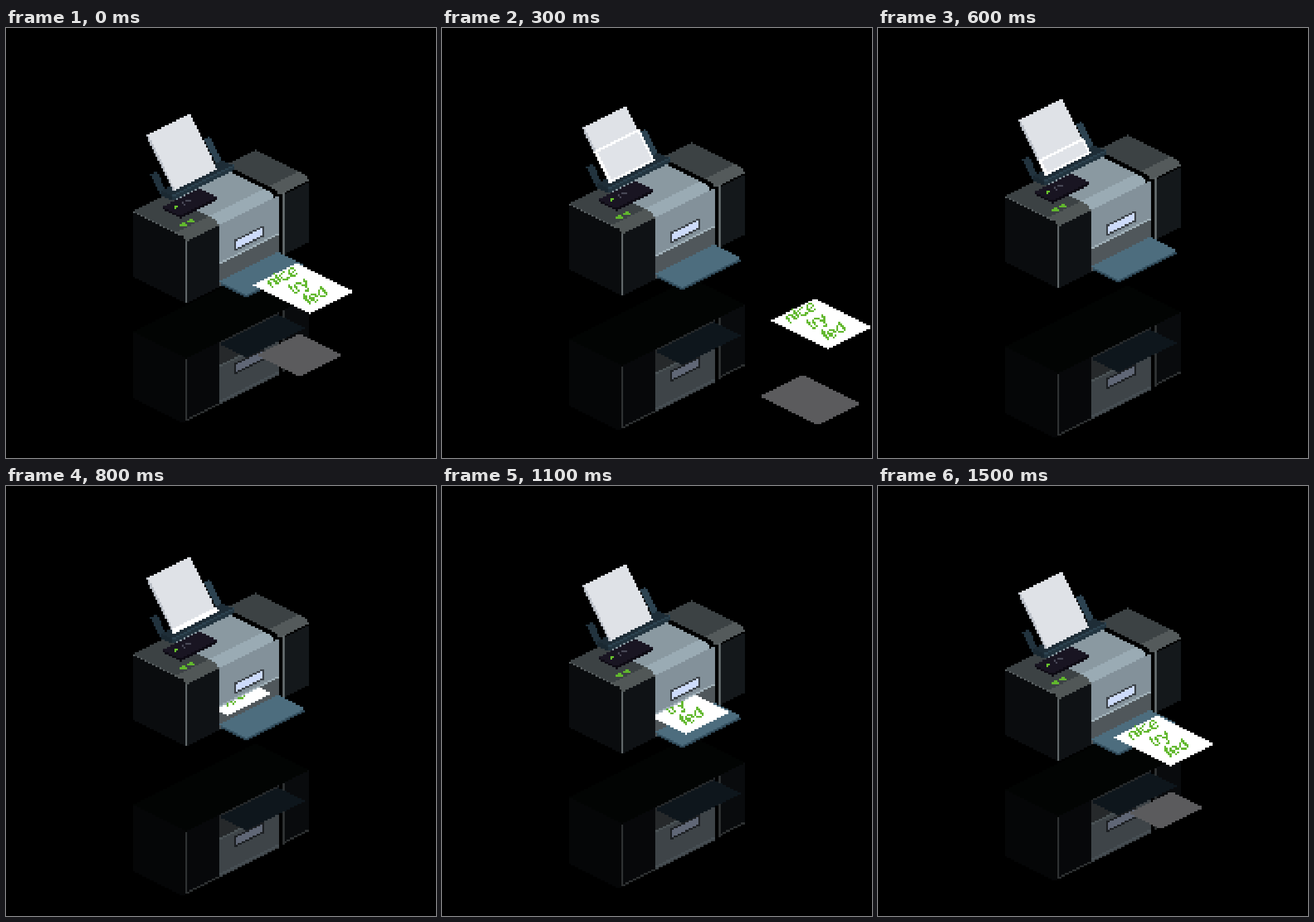
Write an HTML page with a canvas that moves like this. It is 748x748 px and loops after 1.6 s.

```html
<!DOCTYPE html>
<html lang="en">
<head>
<meta charset="utf-8">
<title>Printer</title>
<style>
  html, body { margin: 0; width: 100%; height: 100%; overflow: hidden; background: #000; }
  canvas { display: block; width: 748px; height: 748px; image-rendering: pixelated; }
</style>
</head>
<body>
<canvas id="stage" width="230" height="230"></canvas>
<script>
const SIZE = 230;
const CELL = 748 / SIZE;
const STEP = 100, STEPS = 16;
const DEPTH = 93, WIDTH = 213, HEIGHT = 115;
const BEVEL = 75, CURVE = 86, FRONT_HEIGHT = 108;
const INNER_LEFT = 57, INNER_RIGHT = 161, RIGHT_BLOCK = 168;
const TRAY_END = 140;
const GREEN = '#62b82e', WHITE = '#ffffff', BLACK = '#000000';

const ctx = document.getElementById('stage').getContext('2d');

// Drawing state: offset in cells, brightness, reflection and an optional clip test.
let shiftX, shiftY, tone, mirrored, visible;

function begin({ x = 0, y = 0, light = 1, mirror = false, keep = null }) {
  [shiftX, shiftY, tone, mirrored, visible] = [x, y, light, mirror, keep];
}

function setColor(hex) {
  const channels = hex.match(/\w\w/g).map(c => Math.round(parseInt(c, 16) * tone));
  ctx.fillStyle = `rgb(${channels})`;
}

function dot(x, y) {
  if (!visible || visible((x + .5) * CELL, (y + .5) * CELL)) ctx.fillRect(x, y, 1, 1);
}

// Fills every cell whose centre lies inside the polygon.
function fill(color, ...corners) {
  const points = corners.map(([x, y]) => [x / CELL + shiftX, y / CELL + shiftY]);
  const ys = points.map(p => p[1]);
  setColor(color);
  for (let y = Math.floor(Math.min(...ys)); y <= Math.max(...ys); y++) {
    const cy = y + .5;
    const hits = [];
    points.forEach(([x1, y1], i) => {
      const [x2, y2] = points[(i + 1) % points.length];
      if ((y1 <= cy) !== (y2 <= cy)) hits.push(x1 + (cy - y1) * (x2 - x1) / (y2 - y1));
    });
    hits.sort((p, q) => p - q);
    for (let i = 0; i + 1 < hits.length; i += 2) {
      for (let x = Math.ceil(hits[i] - .5); x < hits[i + 1] - .5; x++) dot(x, y);
    }
  }
}

// a runs right and down, b right and up, h is the height above the base.
function iso(a, b, h) {
  return [221 + a + b, 433 + (a - b) / 2 + (mirrored ? 96 + h : -h)];
}

function slab(color, a0, a1, b0, b1, h0, h1 = h0) {
  fill(color, iso(a0, b0, h0), iso(a0, b1, h0), iso(a1, b1, h1), iso(a1, b0, h1));
}

function front(color, b0, b1, h0, h1, a = DEPTH) {
  fill(color, iso(a, b0, h0), iso(a, b1, h0), iso(a, b1, h1), iso(a, b0, h1));
}

function lid(topColor, bevelColor, b0, b1) {
  slab(topColor, 0, BEVEL, b0, b1, HEIGHT);
  slab(bevelColor, BEVEL, CURVE, b0, b1, HEIGHT);
  slab(bevelColor, CURVE, DEPTH, b0, b1, HEIGHT, FRONT_HEIGHT);
}

function drawFronts() {
  fill('#0a0c0e', iso(0, 0, 0), iso(DEPTH, 0, 0), iso(DEPTH, 0, FRONT_HEIGHT),
    iso(CURVE, 0, HEIGHT), iso(0, 0, HEIGHT));
  front('#0f1215', 0, INNER_LEFT, 0, FRONT_HEIGHT);
  front('#50575b', INNER_LEFT, INNER_RIGHT, 0, 41);
  front('#83919a', INNER_LEFT, INNER_RIGHT, 41, FRONT_HEIGHT);
  front('#a2b2ba', INNER_LEFT, INNER_RIGHT, 40, 43);
  front('#3c4248', 83, 135, 50, 69);
  front('#cddbfa', 87, 132, 53, 66);
  front(BLACK, INNER_RIGHT, RIGHT_BLOCK, 0, FRONT_HEIGHT);
  front('#14181b', RIGHT_BLOCK, WIDTH, 0, FRONT_HEIGHT - 3);
  for (const edge of [0, RIGHT_BLOCK + 1]) front('#61686a', edge - 2, edge + 1.5, 0, FRONT_HEIGHT);
}

function drawMirror(lift) {
  begin({ y: lift, mirror: true });
  slab('#020403', 0, DEPTH, 0, WIDTH, 0);
  tone = .47;
  drawFronts();
  front('#61686a', 0, INNER_LEFT, FRONT_HEIGHT - 3, FRONT_HEIGHT);
  front('#9aabb4', INNER_LEFT, INNER_RIGHT, FRONT_HEIGHT - 7, FRONT_HEIGHT - 3);
  front('#61686a', RIGHT_BLOCK, WIDTH, FRONT_HEIGHT - 6, FRONT_HEIGHT - 3);
  tone = 1;
  slab('#0e161c', DEPTH, TRAY_END, INNER_LEFT, 159, 3);
}

function drawBody() {
  lid('#3c4244', '#545a5b', INNER_RIGHT, WIDTH);
  lid('#3c4244', '#515757', 0, INNER_LEFT);
  lid('#8a99a1', '#9aabb4', INNER_LEFT, INNER_RIGHT - 8);
  lid(BLACK, BLACK, INNER_RIGHT - 8, INNER_RIGHT);
  drawFronts();
  fill('#5b6163', iso(0, 0, HEIGHT), iso(CURVE, 0, HEIGHT),
    iso(CURVE, 0, HEIGHT - 3), iso(0, 0, HEIGHT - 3));

  for (const [color, h] of [['#2e4756', 5], ['#3a5767', 8], ['#4d6d7e', 11]]) {
    slab(color, DEPTH, TRAY_END, INNER_LEFT, 159, h);
  }
}

function drawControls() {
  for (const [color, h] of [['#0d0a13', 112], ['#191522', 116]]) slab(color, 19, 51, 31, 96, h);
  slab('#6ac52d', 28, 34, 40, 46, HEIGHT);
  for (const b of [53, 63]) {
    slab('#494957', 28, 31, b, b + 5, HEIGHT);
    slab('#494957', 31, 35, b + 2, b + 5, HEIGHT);
  }
  for (const b of [20, 33]) {
    slab(GREEN, 64, 72, b - 4, b + 4, HEIGHT);
    slab('#454b4c', 66.5, 69.5, b - 1.5, b + 1.5, HEIGHT);
  }
}

// Blank sheet leaning back: u runs along its foot, v up its length.
function leaning(color, u0, u1, v0, v1) {
  const at = (u, v) => [291 + 76 * u - 47 * v, 283 - 38 * u - 96 * v];
  fill(color, at(u0, v0), at(u1, v0), at(u1, v1), at(u0, v1));
}

function drawFeeder(step) {
  leaning('#22333e', -.27, -.13, 0, .4);
  leaning('#2d4351', 1.02, 1.16, 0, .52);
  slab('#1e2d37', -2, 18, 50, 157, 124);
  front('#22343f', 50, 157, 116, 125, 18);
  front('#2d4350', 50, 157, 122, 125, 18);
  fill('#1a2831', iso(-2, 50, 116), iso(18, 50, 116), iso(18, 50, 124), iso(-2, 50, 124));

  leaning('#dfe2e7', 0, 1, 0, 1);
  leaning('#b9bec6', 0, .04, 0, 1);
  if (step < 1 || step > 8) return;
  const top = .88 - .1 * step;
  leaning(WHITE, 0, 1.04, 0, top);
  leaning('#e0e3e8', .06, .99, .04, top - .04);
}

// Cells covered by the message, lettered in the plane of the paper.
function letterCells() {
  const sheet = document.createElement('canvas');
  sheet.width = sheet.height = SIZE;
  const pen = sheet.getContext('2d');
  pen.setTransform(1 / CELL, -.5 / CELL, .7 / CELL, .85 / CELL, 510 / CELL, 450 / CELL);
  pen.font = '27px "Liberation Sans", Arial, sans-serif';
  pen.textAlign = 'center';
  pen.textBaseline = 'middle';
  ['nice', 'try', 'fed'].forEach((word, i) => pen.fillText(word, 11 * (i - 1), 26 * (i - 1)));
  const { data } = pen.getImageData(0, 0, SIZE, SIZE);
  const found = [];
  for (let i = 0; i < SIZE * SIZE; i++) {
    if (data[4 * i + 3] > 95) found.push([i % SIZE, Math.floor(i / SIZE)]);
  }
  return found;
}
const letters = letterCells();

function drawPaper(step, lift) {
  const feed = paperFeed(step);
  if (feed === null) return;
  const slot = 1193 - lift * 2 * CELL;
  const fallen = step < 7 ? step >> 1 : 0;
  const y = Math.round(feed / 2) - lift + fallen;
  const keep = feed < -17 ? (px, py) => px >= 371 && px + 2 * py >= slot : null;
  begin({ x: feed, y, keep });
  slab(WHITE, 118, 218, 90, 166, 0);
  setColor(GREEN);
  for (const [cx, cy] of letters) dot(cx + feed, cy + y);
}

function drawMirrorPaper(step, lift) {
  const feed = mirrorFeed(step);
  if (feed === null) return;
  const edge = 1574 + lift * 2 * CELL;
  begin({ x: feed, y: Math.round(feed / 2) + lift, mirror: true, keep: (x, y) => x + 2 * y >= edge });
  slab('#5b5b5d', 121.5, 222, 67.5, 142.5, 0);
}

// Smooth rise, a short rest at the top, then a slowing descent.
function liftAt(step) {
  const rise = Math.min(step / 6, 1);
  const fall = Math.min((15 - step) / 7, 1);
  return Math.round(8 * rise * rise * (3 - 2 * rise) * fall ** 1.2);
}

// The page creeps out of the slot, speeds up, then flies off.
function paperFeed(step) {
  if (step < 6) return Math.round(step * (7.6 + 2.35 * step));
  if (step < 7) return null;
  if (step < 11) return -32 - 4 * (11 - step);
  return step < 13 ? -18 - 7 * (13 - step) : -6 * (STEPS - step);
}

function mirrorFeed(step) {
  if (step < 6) return Math.round(step * (6.5 + 2.75 * step));
  return step < 12 ? null : -6 - 4 * (15 - step);
}

function draw() {
  const step = Math.floor(performance.now() / STEP) % STEPS;
  const lift = liftAt(step);
  ctx.fillStyle = BLACK;
  ctx.fillRect(0, 0, SIZE, SIZE);
  drawMirror(lift);
  drawMirrorPaper(step, lift);
  begin({ y: -lift });
  drawBody();
  drawControls();
  drawFeeder(step);
  drawPaper(step, lift);
  requestAnimationFrame(draw);
}
draw();
</script>
</body>
</html>
```
